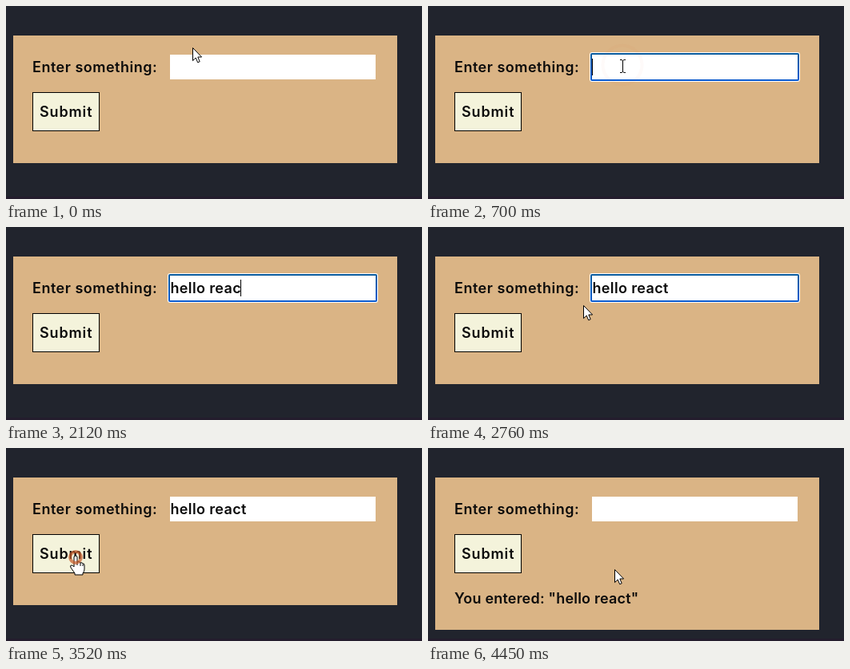
Animation of 520 by 242 pixels, one loop 4480 ms. Source, as an HTML page with a canvas:

```html
<!DOCTYPE html>
<html lang="en">
<head>
<meta charset="utf-8">
<title>Form submit</title>
<style>
  html, body { margin: 0; width: 100%; height: 100%; overflow: hidden; background: #21242d; }
  canvas { display: block; }
</style>
</head>
<body>
<canvas id="stage" width="520" height="242"></canvas>
<script>
const ctx = document.getElementById('stage').getContext('2d');
const LOOP = 4480;
const FOCUS = 420, BLUR = 3460, SUBMIT = 3620;
const MESSAGE = 'hello react';
const KEY_TIMES = [1300, 1420, 1640, 1700, 1770, 1840, 1900, 1960, 2040, 2110, 2240];
const BLINK = 500;

const smooth = u => u * u * (3 - 2 * u);
const easeOut = u => 1 - (1 - u) ** 2;
const START = [233, 52];
const MOVES = [
  { from: 30, to: 330, at: [243, 75], ease: smooth },
  { from: 2580, to: 3060, at: [90, 148], ease: smooth },
  { from: 3120, to: 3320, at: [87, 136], ease: smooth },
  { from: 3640, to: 4320, at: [233, 152], ease: easeOut }
];
const CLICKS = [{ time: FOCUS, at: [243, 74] }, { time: BLUR, at: [87, 137] }];

const ARROW = new Path2D('M.5.5V16.6L4.2 13 6.7 18.8 9.2 17.7 6.8 12H11.6Z');
const HAND = new Path2D('M-2 1Q-2-1 0-1Q2-1 2 1V7Q5 5.5 6 8Q8.5 7 9 9Q11 8.5 11 11V16' +
  'Q11 19 9 21V23H-1V21L-6 14Q-7.5 11-5 11Q-3.5 11-2 13Z');
const KNUCKLES = new Path2D('M2 7V11M6 8V12M9 9.5V12');
const BEAM = new Path2D('M-3-7.5H-1L.5-6.5 2-7.5H4M.5-6.5V7.5M-3 8.5H-1L.5 7.5 2 8.5H4');

function rect(color, x, y, w, h) {
  ctx.fillStyle = color;
  ctx.fillRect(x, y, w, h);
}

function rounded(color, x, y, w, h, r) {
  ctx.fillStyle = color;
  ctx.beginPath();
  ctx.roundRect(x, y, w, h, r);
  ctx.fill();
}

function text(string, x, y, tracking) {
  ctx.font = '600 18px Inter, sans-serif';
  ctx.letterSpacing = tracking + 'px';
  ctx.fillStyle = '#0b0b0b';
  ctx.fillText(string, x, y);
  return ctx.measureText(string).width;
}

function pointerAt(t) {
  let [x, y] = START;
  for (const move of MOVES) {
    if (t < move.from) break;
    const k = move.ease(Math.min(1, (t - move.from) / (move.to - move.from)));
    x += (move.at[0] - x) * k;
    y += (move.at[1] - y) * k;
  }
  return [x, y];
}

const inside = (x, y, left, top, right, bottom) =>
  x >= left && x <= right && y >= top && y <= bottom;

function drawPointer(t) {
  if (t >= KEY_TIMES[0] && t < MOVES[1].from) return;
  const [x, y] = pointerAt(t);
  ctx.save();
  ctx.translate(Math.floor(x), Math.floor(y));
  ctx.lineWidth = 1;
  ctx.lineJoin = 'round';
  ctx.strokeStyle = '#000';
  ctx.fillStyle = '#fff';
  if (inside(x, y, 205, 61, 462, 92)) {
    ctx.stroke(BEAM);
  } else {
    const onButton = inside(x, y, 33, 108, 117, 157);
    const shape = onButton ? HAND : ARROW;
    ctx.fill(shape);
    ctx.stroke(shape);
    if (onButton) ctx.stroke(KNUCKLES);
  }
  ctx.restore();
}

function drawRipple(t, click) {
  const age = t - click.time;
  if (age < 0 || age > 300) return;
  ctx.save();
  ctx.globalAlpha = 0.95 * (1 - age / 300) ** 1.3;
  ctx.strokeStyle = '#c85a28';
  ctx.lineWidth = 4;
  ctx.beginPath();
  ctx.arc(...click.at, 2 + age * 0.08, 0, Math.PI * 2);
  ctx.stroke();
  ctx.restore();
}

function drawInput(t) {
  const focused = t >= FOCUS && t < BLUR;
  if (focused) {
    rounded('#fff', 202, 58, 263, 37, 3);
    const blue = ctx.createLinearGradient(0, 59, 0, 94);
    blue.addColorStop(0, '#0b5c9c');
    blue.addColorStop(1, '#0c5bd0');
    rounded(blue, 203, 59, 261, 35, 2);
  }
  rect('#fff', 205, 61, 257, 31);

  const typed = KEY_TIMES.filter(time => time <= t);
  const value = t < SUBMIT ? MESSAGE.slice(0, typed.length) : '';
  const width = text(value, 205.5, 83, 0.35);
  const since = t - (typed.at(-1) ?? FOCUS);
  if (focused && Math.floor(since / BLINK) % 2 === 0) {
    rect('#000', Math.round(205 + width), 66, 1, 21);
  }
}

function draw(t) {
  const submitted = t >= SUBMIT;
  rect('#21242d', 0, 0, 520, 242);
  rect('#241d2d', 0, 239, 520, 3);
  rect('#dab485', 9, 37, 480, submitted ? 191 : 160);
  text('Enter something:', 33, 83, 0.5);
  drawInput(t);
  rect('#000', 33, 108, 84, 49);
  rect('#f4f3db', 34, 109, 82, 47);
  text('Submit', 42, 139, 0.85);
  if (submitted) text(`You entered: "${MESSAGE}"`, 33, 195, 0.2);
  drawPointer(t);
  CLICKS.forEach(click => drawRipple(t, click));
}

const began = performance.now();
function tick() {
  draw((performance.now() - began) % LOOP);
  requestAnimationFrame(tick);
}
tick();
</script>
</body>
</html>
```
